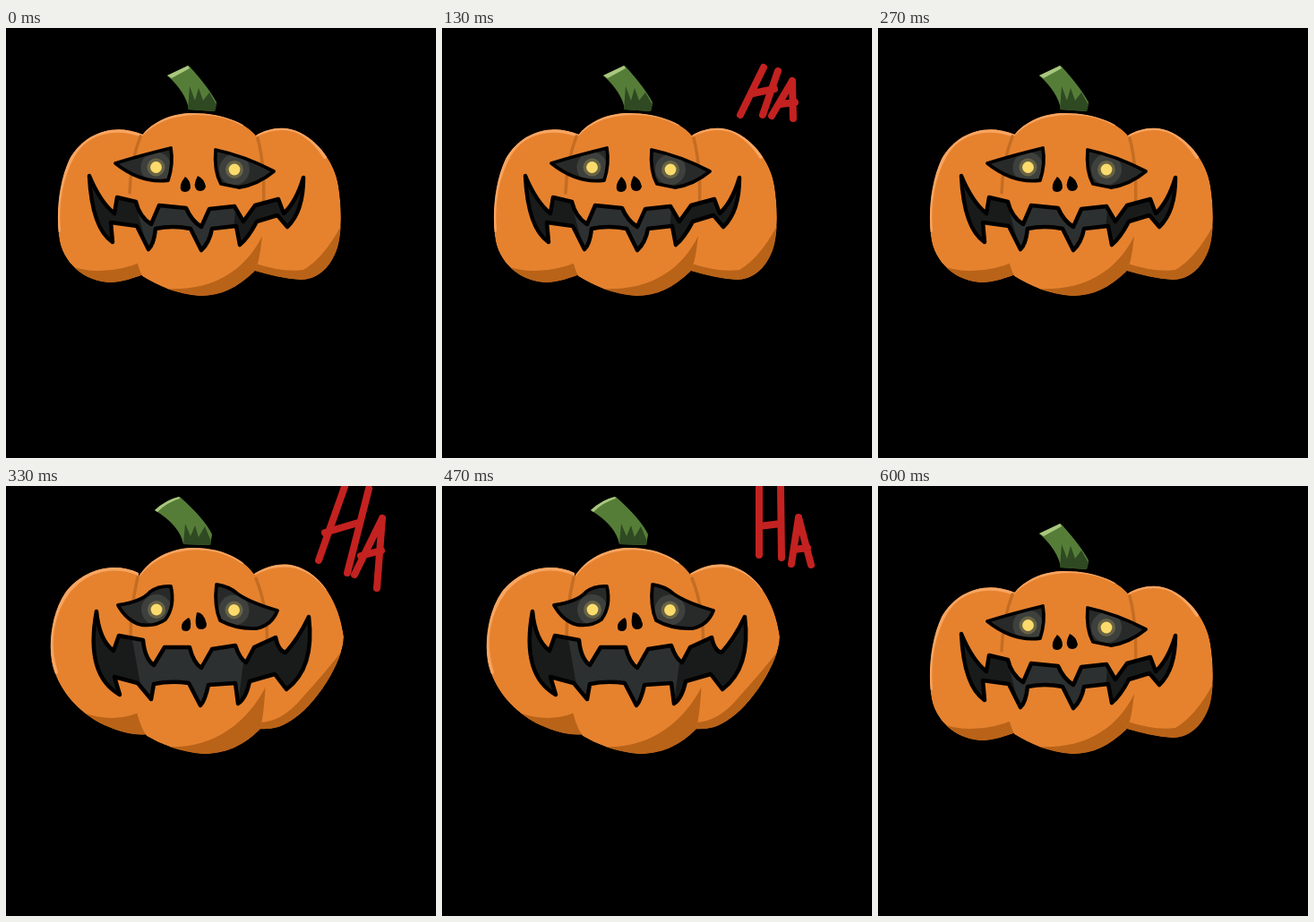
Write an HTML page that moves like this. It is 480x480 px and loops after 670 ms.

```html
<!DOCTYPE html>
<html lang="en">
<head>
<meta charset="utf-8">
<title>Laughing pumpkin</title>
<style>
html, body { margin: 0; width: 100%; height: 100%; overflow: hidden; background: #000; }
svg { display: block; width: 100vw; height: 100vh; }
.line { fill: none; stroke-linecap: round; stroke-linejoin: round; }
</style>
</head>
<body>
<svg id="stage" viewBox="0 0 480 480"></svg>
<script>
const ORANGE = '#e6822e', SHADE = '#b96318', LIGHT = '#f8a561', SEAM = '#c56d22';
const RED = '#c32220';

// Each lobe: outline, shadow, highlight line.
const calm = {
  lobes: [
    ['M153 119C120 105 88 117 71 146C59 172 56 205 59 232C62 262 88 284 118 284C132 283 142 279 154 275Z',
     'M66 264Q108 280 154 260V290H80Z',
     'M59 226C56 195 62 165 75 142C91 115 122 109 153 120'],
    ['M279 120C290 113 305 110 318 113C345 120 367 149 371 176C375 200 375 228 370 245C362 270 345 281 329 281C312 280 295 276 278 271Z',
     'M276 262Q308 273 332 270Q356 256 376 217V285H276Z',
     'M280 119Q302 108 322 114Q342 122 356 144'],
    ['M150 122C165 102 188 95 208 95C245 95 272 108 282 124C291 150 290 205 285 240C283 258 280 268 277 272C258 290 240 299 217 299C190 297 170 288 152 277C142 255 137 220 137 188C137 160 142 135 150 122Z',
     'M178 291C228 294 266 273 286 232V300H178Z',
     'M151 119C178 90 232 89 264 107']
  ],
  seams: ['M150 121Q139 150 138 184', 'M281 123Q290 158 287 206'],
  stem: ['M180 53L204 42Q226 66 235 83L233 93L204 91Q201 72 180 53Z',
         'M180 53L203 42L205 45L185 56Z',
         'M203 91L205 65L211 81L215 67L220 81L227 72L235 86L233 93Z'],
  mouth: 'M93 165Q105 194 121 207L124 189L145 194Q149 211 162 219L171 198L201 201Q207 215 218 222L227 202L255 199L265 216L278 198L304 191L310 207Q324 194 332 167Q332 205 314 222L303 209L280 216Q270 235 261 242L257 221L230 224Q227 240 218 248L206 224Q186 220 167 224Q165 242 159 247L146 221L117 217L119 239Q96 224 93 165Z',
  glow: 'M140 180H258L252 250H159Z',
  eyes: [['M122 151Q151 142 184 134Q187 152 181 170Q151 174 122 151Z', 167.5, 155.5],
         ['M234 136Q267 143 299 160Q281 175 260 178L240 174Q232 160 234 136Z', 255, 158]],
  nose: 'M200 166Q192 176 196 182Q204 185 206 178Q206 170 200 166ZM214 165Q208 176 213 181Q221 184 223 177Q221 168 214 165Z'
};
const laugh = {
  lobes: [
    ['M148 97C120 84 86 93 66 119C49 145 46 185 54 207C64 235 85 255 110 267C128 275 145 279 158 277Z',
     'M86 253Q126 267 158 248V284H100Z',
     'M56 208C45 174 52 140 71 116C92 92 122 87 148 98'],
    ['M277 98C290 90 305 85 322 89C352 97 372 130 377 168C377 196 345 246 318 262C306 270 295 272 282 271Z',
     'M282 264Q308 264 331 236Q355 210 380 178V280H282Z',
     'M278 97Q302 85 324 90Q345 96 358 114'],
    ['M147 103C160 80 185 70 206 69C245 68 270 85 280 103C290 125 294 160 291 195C290 225 288 255 284 271C265 290 245 299 220 299C195 297 172 288 157 279C144 262 138 215 138 178C138 145 142 118 147 103Z',
     'M178 291C230 294 268 266 290 224V300H178Z',
     'M148 99C174 65 230 60 264 85']
  ],
  seams: ['M147 102Q139 136 139 170', 'M279 103Q294 140 291 188'],
  stem: ['M166 27Q180 15 194 12Q222 37 230 54L228 66L198 65Q194 44 166 27Z',
         'M166 27Q179 15 193 12L194 14Q180 18 169 29Z',
         'M198 65L200 42L206 56L211 44L215 57L222 45L229 62L228 66Z'],
  mouth: 'M101 140Q104 172 120 184L126 167L153 172Q155 193 165 200L177 180L205 180Q209 197 218 203L230 182L256 178Q261 193 268 197L277 180L301 169Q304 184 312 186Q326 171 338 146Q345 203 313 227L300 210L272 218Q268 237 259 243L256 220L226 222Q222 240 217 245L204 220Q184 217 165 221L162 238L147 220L121 213L127 233Q88 211 101 140Z',
  glow: 'M139 160H270L258 250H155Z',
  eyes: [['M125 133Q152 129 161 118Q171 111 184 112Q189 134 178 149Q167 157 151 155Q135 151 125 133Z', 168, 138],
         ['M235 110Q249 112 258 120Q272 130 303 139Q297 155 280 159Q257 160 239 150Q232 134 235 110Z', 254.5, 138.5]],
  nose: 'M204 147Q193 153 197 161Q204 164 206 158Q207 150 204 147ZM213 141Q221 141 224 154Q224 160 217 160Q209 159 213 141Z'
};

// Lettering as brush strokes: H first, then A.
const words = {
  tall: 'M378 1L349 83M405 3L381 97M356 52L393 41M420 36L389 99M420 36L414 114M396 78L419 72',
  first: 'M359 44L333 97M375 48L358 97M347 73L371 68M391 59L368 98M391 59L392 101M378 85L394 83',
  upright: 'M320 8L326 80M356 3L346 86M321 46L352 38M374 33L368 83M374 33L389 77M371 64L384 60',
  small: 'M396 60L362 117M410 71L382 120M377 95L400 92M418 93L389 130M418 93L418 134M398 119L418 116',
  thin: 'M354 2L354 77M378 1L379 80M354 45L378 42M398 35L390 87M398 35L412 88M393 71L408 69'
};

// Start time, head, word, word shift.
const steps = [
  [0, 'calm'],
  [70, 'laugh', 'tall', -30],
  [130, 'calm', 'first', 0],
  [200, 'laugh', 'upright', 0],
  [270, 'calm'],
  [330, 'laugh', 'tall', 0],
  [400, 'calm', 'small', 0],
  [470, 'laugh', 'thin', 0],
  [530, 'calm']
];
const LOOP = 670;

const fill = (d, color) => `<path d="${d}" fill="${color}"/>`;
const line = (d, color, width) =>
  `<path class="line" d="${d}" stroke="${color}" stroke-width="${width}"/>`;
const dot = (x, y, r, color) => `<circle cx="${x}" cy="${y}" r="${r}" fill="${color}"/>`;
const clipped = (id, d, inner) =>
  `<clipPath id="${id}"><path d="${d}"/></clipPath><g clip-path="url(#${id})">${inner}</g>`;

function head(name, p) {
  const lobes = p.lobes.map(([shape, shade, light], i) => clipped(`${name}-lobe${i}`, shape,
    fill(shape, ORANGE) + fill(shade, SHADE) + line(light, LIGHT, 4))).join('');
  const eyes = p.eyes.map(([shape, x, y], i) => clipped(`${name}-eye${i}`, shape,
    fill(shape, '#282a29') + dot(x, y, 17, '#3e403d') + dot(x, y, 10, '#676345') +
    dot(x, y, 6.4, '#fbdb6b')) + line(shape, '#000', 3.8)).join('');
  const [stem, cut, notch] = p.stem;
  return `<g id="${name}">` + lobes + p.seams.map(d => line(d, SEAM, 3.5)).join('') +
    fill(stem, '#557d38') + fill(cut, '#a9c77d') + fill(notch, '#2f4922') +
    clipped(`${name}-mouth`, p.mouth, fill(p.mouth, '#191b1b') + fill(p.glow, '#2d3030')) +
    line(p.mouth, '#000', 4.5) + eyes + fill(p.nose, '#000') + '</g>';
}

const stage = document.getElementById('stage');
stage.innerHTML = '<rect width="480" height="480"/>' + head('calm', calm) + head('laugh', laugh) +
  `<path id="word" class="line" stroke="${RED}" stroke-width="8"/>`;

const heads = ['calm', 'laugh'].map(id => document.getElementById(id));
const word = document.getElementById('word');

function draw() {
  const t = performance.now() % LOOP;
  const [, pose, text, shift = 0] = steps.filter(s => s[0] <= t).pop();
  for (const h of heads) h.setAttribute('display', h.id === pose ? 'inline' : 'none');
  word.setAttribute('d', text ? words[text] : '');
  word.setAttribute('transform', `translate(${shift} 0)`);
  requestAnimationFrame(draw);
}
draw();
</script>
</body>
</html>
```
